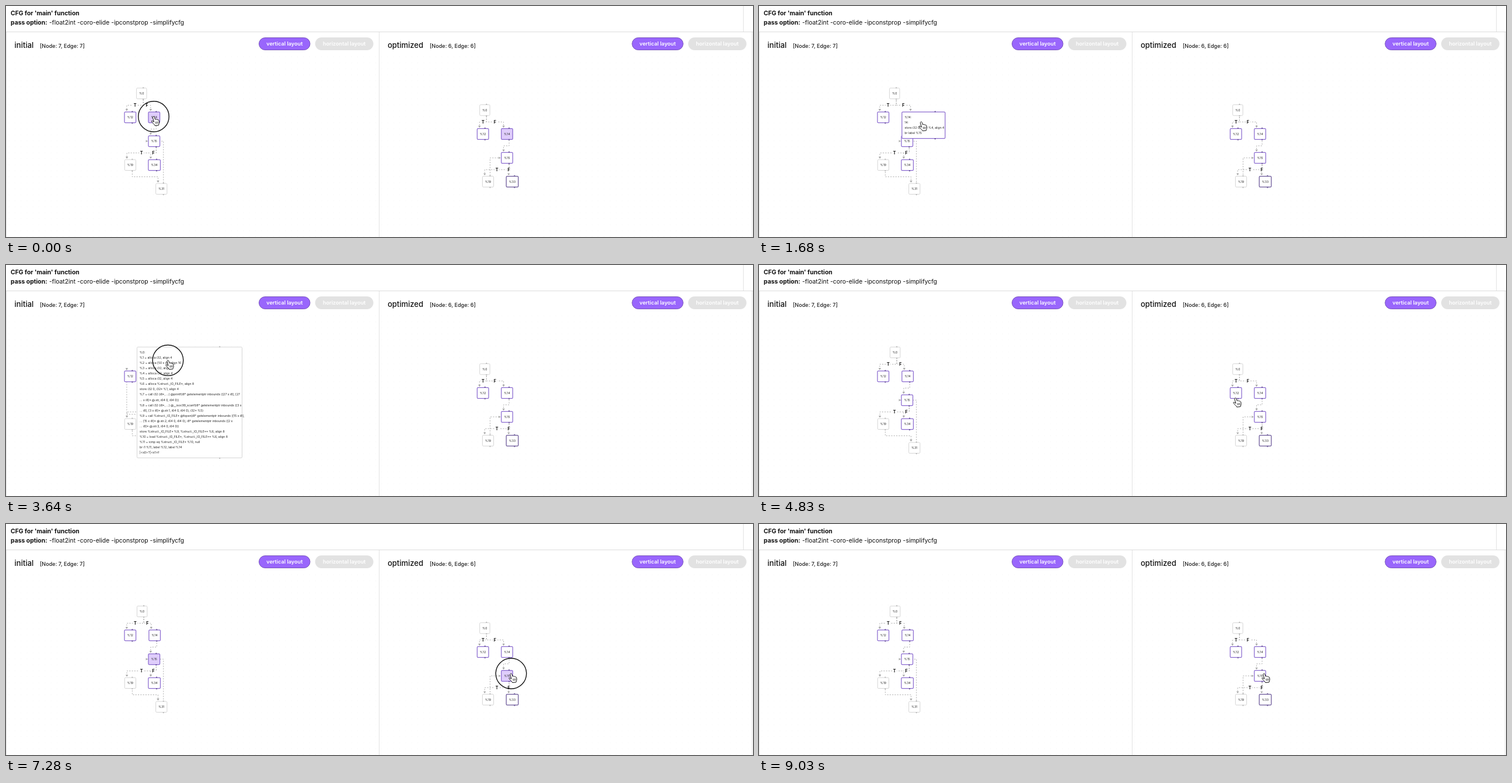
An HTML page that plays this animation: 1280 px wide and 397 px high, repeating every 9.1 s.

```html
<!DOCTYPE html>
<html lang="en">
<head>
<meta charset="utf-8">
<title>CFG viewer</title>
<style>
html, body { margin: 0; width: 100%; height: 100%; overflow: hidden; background: #fff; }
svg { display: block; width: 100vw; height: 100vh; }
text { font-family: Inter, sans-serif; white-space: pre; }
.code { font-size: 5.1px; fill: #222; }
.label { font-size: 7.2px; font-weight: 700; fill: #111; text-anchor: middle; }
.edge { fill: none; stroke: #aaa; stroke-width: .9; stroke-dasharray: 2.15; }
.tip { fill: #a8a8a8; }
.head { font-size: 10.4px; fill: #111; }
.name { font-size: 13px; font-weight: 500; fill: #111; }
.small { font-size: 9.1px; font-weight: 500; fill: #222; }
.btn { font-size: 9.1px; font-weight: 600; fill: #fff; text-anchor: middle; }
</style>
</head>
<body>
<svg viewBox="0 0 1280 397" preserveAspectRatio="none">
  <defs>
    <pattern id="dots" width="10.3" height="10.3" patternUnits="userSpaceOnUse">
      <circle cx="5" cy="5" r=".5" fill="#eee"/>
    </pattern>
  </defs>
  <rect width="1280" height="397" fill="#fff"/>
  <rect x="1" y="84" width="1277" height="313" fill="url(#dots)"/>
  <g id="page"></g>
  <g id="graph"></g>
  <circle id="ring" r="26.3" fill="none" stroke="#111" stroke-width="1.4"/>
  <g id="hand" stroke="#111" stroke-width="1" stroke-linejoin="round" stroke-linecap="round">
    <path fill="#fff" d="M-1.6 1.6C-1.8-.2 .9-.6 1.4 1.2L2.6 5C3 4.2 4.6 4.2 4.9 5.2C5.6 4.6 6.8 4.8 7.1 5.8C8 5.4 9 6 9.2 7L9.6 10C9.7 12 8.8 13 8.4 15L2.2 15.6C1.5 13.5-1 12-2.6 9.8C-4.6 7.6-3.2 6.8-1.8 7.8L.2 9Z"/>
    <path fill="none" stroke-width=".7" d="M3.3 9.2L3.7 12.2M5.2 9L5.6 12M7.1 8.8L7.4 11.8"/>
  </g>
  <path id="arrow" d="M0 0V11.6L2.7 9.1L4.6 13.4L6.6 12.5L4.8 8.3H8.4Z" fill="#111" stroke="#fff" stroke-width=".8"/>
</svg>
<script>
const LOOP = 9100, STEP = 70, ROW = 9.05, PAD = 4.75;
const GREY = '#d6d6d6', PURPLE = '#8b6bd0', DARK = '#6a5698';
const $ = id => document.getElementById(id);
const esc = s => s.replace(/&/g, '&amp;').replace(/</g, '&lt;');
const text = (cls, x, y, s, extra = '') => `<text class="${cls}" x="${x}" y="${y}" ${extra}>${esc(s)}</text>`;

const code = {
  '%0': [180, `%0:
%1 = alloca i32, align 4
%2 = alloca [50 x i8], align 16
%3 = alloca i32, align 4
%4 = alloca i32, align 4
%5 = alloca i32, align 4
%6 = alloca %struct._IO_FILE*, align 8
store i32 0, i32* %1, align 4
%7 = call i32 (i8*, ...) @printf(i8* getelementptr inbounds ([27 x i8], [27
... x i8]* @.str, i64 0, i64 0))
%8 = call i32 (i8*, ...) @__isoc99_scanf(i8* getelementptr inbounds ([3 x
... i8], [3 x i8]* @.str.1, i64 0, i64 0), i32* %5)
%9 = call %struct._IO_FILE* @fopen(i8* getelementptr inbounds ([15 x i8],
... [15 x i8]* @.str.2, i64 0, i64 0), i8* getelementptr inbounds ([2 x
... i8]* @.str.3, i64 0, i64 0))
store %struct._IO_FILE* %9, %struct._IO_FILE** %6, align 8
%10 = load %struct._IO_FILE*, %struct._IO_FILE** %6, align 8
%11 = icmp eq %struct._IO_FILE* %10, null
br i1 %11, label %12, label %14
|<s0>T|<s1>F`],
  '%12': [173, `%12:
12:
%13 = call i32 (i8*, ...) @printf(i8* getelementptr inbounds ([22 x i8],
... [22 x i8]* @.str.4, i64 0, i64 0))
call void @exit(i32 1) #3
unreachable`],
  '%14': [74, `%14:
14:
store i32 0, i32* %4, align 4
br label %15`],
  '%15': [83, `%15:
15:
%16 = load i32, i32* %4, align 4
%17 = load i32, i32* %5, align 4
%18 = icmp slt i32 %16, %17
br i1 %18, label %19, label %33
|<s0>T|<s1>F`]
};

// Nodes: name, left, top, colour, width. Edges: from, to, label; '<' enters at the side.
const graphs = [
  { nodes: [['%0', 223.6, 141, GREY, 17.4], ['%12', 203, 182, PURPLE, 19.6], ['%14', 244, 182, PURPLE, 19.6],
            ['%15', 244, 223, PURPLE, 19.6], ['%19', 203.3, 264, GREY, 19.2], ['%34', 243.9, 264, PURPLE, 20.6],
            ['%31', 256.7, 305, GREY, 19.2]],
    edges: [['%0', '%12', 'T'], ['%0', '%14', 'F'], ['%14', '%15', ''], ['%15', '%19', 'T'],
            ['%15', '%34', 'F'], ['%19', '%31', ''], ['%31', '%15', '<']] },
  { nodes: [['%0', 811.7, 169.7, GREY, 17.4], ['%12', 807.4, 210.7, PURPLE, 19.6], ['%14', 848.7, 210.7, PURPLE, 19.6],
            ['%15', 848.7, 251.7, PURPLE, 19.6], ['%19', 816.4, 292.6, GREY, 19.2], ['%33', 857.2, 292.6, DARK, 20.6]],
    edges: [['%0', '%12', 'T'], ['%0', '%14', 'F'], ['%14', '%15', ''], ['%15', '%19', 'T'],
            ['%15', '%33', 'F'], ['%19', '%15', '<']] }
];

// Each opening: panel, node, press, open, second press, close.
const visits = [
  [0, '%14', 0, 210, 1820, 2030],
  [0, '%0', 2520, 2730, 3500, 3710],
  [1, '%12', 5040, 5250, 5950, 6160],
  [1, '%15', 7140, 7350, 8540, 8750]
];

const path = [
  [0, 253, 190], [770, 253, 190], [1190, 278, 199], [2050, 278, 199],
  [2450, 224.6, 150.7], [2870, 224.6, 150.7], [3290, 277.5, 163.8], [3990, 277.5, 163.8],
  [4760, 816.5, 228.5], [6160, 816.5, 228.5], [6230, 817.5, 230.3], [6370, 817.5, 230.3],
  [6650, 838, 303], [6930, 865.5, 257], [LOOP, 865.5, 257]
];

function pointer(t) {
  let i = 1;
  while (i < path.length - 1 && path[i][0] < t) i++;
  const [t0, x0, y0] = path[i - 1], [t1, x1, y1] = path[i];
  const u = (t - t0) / (t1 - t0), k = u * u * (3 - 2 * u);
  return [x0 + (x1 - x0) * k, y0 + (y1 - y0) * k];
}

function place(panel, t) {
  return graphs[panel].nodes.map(([name, x, y, color, width]) => {
    const n = { name, x, y, color, w: width, lines: [name], open: false, lit: false };
    for (const [p, id, press, open, , close] of visits) {
      if (id !== name) continue;
      if (t >= press && t < open) n.lit = true;
      if (p !== panel) continue;
      if (p === 0 && t >= open) n.x = x + .9;
      if (t >= open && t < close) {
        n.open = true;
        n.w = code[id][0];
        n.lines = code[id][1].split('\n');
      }
    }
    n.h = n.lines.length * ROW + 2 * PAD;
    n.out = n.x + n.w * .8 - 2.3;
    n.into = n.x + n.w * .2;
    return n;
  });
}

function drawEdge(a, b, label, shift) {
  const dash = `stroke-dashoffset="${shift}"`;
  if (label === '<') {
    const y = b.y + b.h / 2, x = b.x - 1;
    return `<path class="edge" ${dash} d="M${a.out} ${a.y - 1}V${y}H${x - 2}"/>` +
      `<path class="tip" d="M${x} ${y}l-3.4 -2v4z"/>`;
  }
  const y0 = a.y + a.h + 1, y1 = b.y - 1.5, mid = (y0 + y1) / 2, cx = (a.out + b.into) / 2;
  let s = `<path class="edge" ${dash} d="M${a.out} ${y0}V${mid}H${b.into}V${y1 - 2}"/>` +
    `<path class="tip" d="M${b.into} ${y1}l-2.2 -3.4h4.4z"/>`;
  if (label) s += `<rect x="${cx - 4}" y="${mid - 4}" width="8" height="8" rx="1" fill="#fff"/>` +
    text('label', cx, mid + 2.6, label);
  return s;
}

function drawNode(n) {
  const grey = n.color === GREY;
  const dot = y => `<rect x="${n.out - 1.2}" y="${y - 1}" width="2.4" height="2" rx=".8" fill="${grey ? '#bbb' : DARK}"/>`;
  let s = `<rect x="${n.x}" y="${n.y}" width="${n.w}" height="${n.h}" rx="1.6" fill="${n.lit ? '#dfcdfb' : '#fff'}" ` +
    `stroke="${n.color}" stroke-width="${grey ? 1 : 1.25}"/>` + dot(n.y - .6) + dot(n.y + n.h + .6);
  n.lines.forEach((line, i) => {
    const y = n.y + PAD + ROW * (i + .5) + 1.8;
    s += n.open ? text('code', n.x + 4.6, y, line)
      : text('code', n.x + n.w / 2, y, line, 'text-anchor="middle"');
  });
  return s;
}

function drawPage() {
  const line = (d, c = '#e2e2e2') => `<path d="${d}" stroke="${c}" fill="none"/>`;
  let s = line('M0 44.5H1280', '#dcdcdc') + line('M1263.5 0V44M.5 45V397M639.5 45V397M1278.5 45V397') +
    text('head', 8, 15.6, "CFG for 'main' function", 'font-weight="700"') +
    text('head', 8, 32, 'pass option:', 'font-weight="700"') +
    text('head', 74, 32, '-float2int -coro-elide -ipconstprop -simplifycfg');
  [['initial', 58, '[Node: 7, Edge: 7]'], ['optimized', 726, '[Node: 6, Edge: 6]']].forEach(([name, x, count], i) => {
    const o = i * 639.3;
    s += text('name', 14.6 + o, 72, name) + text('small', x, 72, count) +
      `<rect x="${433.5 + o}" y="54.5" width="87.5" height="21" rx="10.5" fill="#9966fc" stroke="#7955bd"/>` +
      text('btn', 477.3 + o, 68.2, 'vertical layout') +
      `<rect x="${529.7 + o}" y="54" width="99.8" height="22" rx="11" fill="#e2e2e2"/>` +
      text('btn', 579.6 + o, 68.2, 'horizontal layout');
  });
  $('page').innerHTML = s;
}

function draw(t) {
  const [x, y] = pointer(t), shift = -(t % 500) / 500 * 4.3;
  let s = '', over = false;
  graphs.forEach((g, i) => {
    const nodes = place(i, t), find = id => nodes.find(n => n.name === id);
    s += g.edges.map(([a, b, label]) => drawEdge(find(a), find(b), label, shift)).join('');
    nodes.sort((a, b) => a.open - b.open);
    s += nodes.map(drawNode).join('');
    over = over || nodes.some(n => x >= n.x && x <= n.x + n.w && y >= n.y && y <= n.y + n.h);
  });
  $('graph').innerHTML = s;
  const pressed = visits.some(([, , a, b, c, d]) => (t >= a && t < b) || (t >= c && t < d));
  const show = (id, on) => {
    $(id).setAttribute('transform', `translate(${x} ${y})`);
    $(id).setAttribute('visibility', on ? 'visible' : 'hidden');
  };
  show('ring', pressed);
  show('hand', over);
  show('arrow', !over);
}

drawPage();
draw(0);
const start = performance.now();
let last = 0;
function tick() {
  const t = Math.floor((performance.now() - start) % LOOP / STEP) * STEP;
  if (t !== last) draw(last = t);
  requestAnimationFrame(tick);
}
requestAnimationFrame(tick);
</script>
</body>
</html>
```
